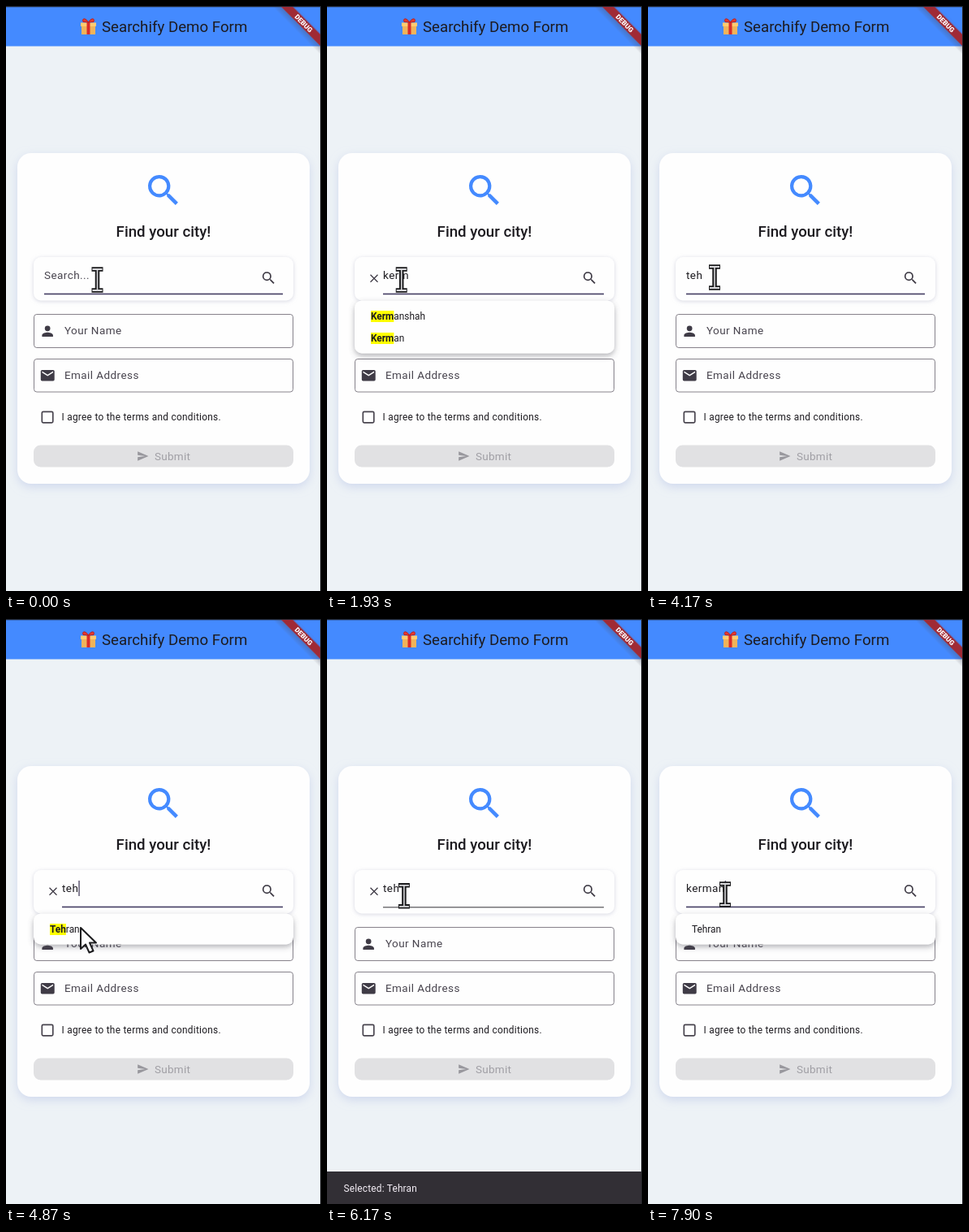
An HTML page for the animation above (8 s loop, 388x720 px).

```html
<!DOCTYPE html>
<html lang="en">
<head>
<meta charset="utf-8">
<title>Searchify Demo Form</title>
<style>
  html, body { margin: 0; height: 100%; overflow: hidden; background: #edf2f6; }
  svg { display: block; width: 388px; height: 720px; }
  text { font: 11.85px Roboto, sans-serif; fill: #1d1b20; white-space: pre; }
  .body { font-size: 13.5px; letter-spacing: .42px; }
  .label { fill: #49454f; }
  .small { letter-spacing: .28px; }
  .bold { font-weight: 700; }
  .field { fill: none; stroke: #79747e; stroke-width: .9; }
  .hover { stroke: #1d1b20; }
  .card { fill: #fefefe; }
  .icon { fill: #3f3b46; }
</style>
</head>
<body>
<svg viewBox="0 0 388 720">
  <defs>
    <filter id="glow" x="-10%" y="-10%" width="120%" height="125%">
      <feDropShadow dx="0" dy="4" stdDeviation="6" flood-color="#c3cdea" flood-opacity=".7"/>
    </filter>
    <filter id="lift" x="-10%" y="-30%" width="120%" height="190%">
      <feDropShadow dx="0" dy="3" stdDeviation="3.5" flood-color="#55555f" flood-opacity=".45"/>
    </filter>
    <filter id="soft" x="-10%" y="-30%" width="120%" height="160%">
      <feDropShadow dx="0" dy="1" stdDeviation="2.5" flood-color="#c4c6d6" flood-opacity=".7"/>
    </filter>
    <path id="lens" d="M15.5 14h-.79l-.28-.27A6.5 6.5 0 1 0 13.73 14.43l.27.28v.79l5 4.99L20.49 19zM9.5 14a4.5 4.5 0 1 1 0-9 4.5 4.5 0 0 1 0 9z"/>
    <path id="beam" d="M-7-13H7M-7 13H7M0-13V13"/>
  </defs>

  <rect width="388" height="720" fill="#edf2f6"/>
  <rect width="388" height="49.500" fill="#448aff"/>
  <rect width="388" height="1.300" fill="#20242c"/>

  <g transform="translate(91 15)">
    <path d="M2 9H19V20H2z" fill="#f0b45a"/>
    <path d="M1 5.500H20V10H1z" fill="#ffcb70"/>
    <path d="M8.500 5H12.500V20H8.500z" fill="#d92b2b"/>
    <path d="M10.500 5C7-1 2 0 4 4.500ZM10.500 5C14-1 19 0 17 4.500Z" fill="#e63a2e" stroke="#b81f1f"/>
  </g>
  <text x="118" y="32" style="font-size:18.7px">Searchify Demo Form</text>

  <svg x="320" y="1" width="67" height="62">
    <g transform="translate(67 0) rotate(45)">
      <rect x="-50" y="23.700" width="100" height="10.200" fill="#a02c36" filter="url(#lift)"/>
      <text y="31.800" text-anchor="middle" style="font-size:8.5px;font-weight:900;fill:#fff">DEBUG</text>
    </g>
  </svg>

  <rect class="card" x="14" y="181" width="360" height="407" rx="17" filter="url(#glow)"/>
  <use href="#lens" transform="translate(168.600 201.600) scale(2.115)" fill="#448aff"/>
  <text x="194" y="284" text-anchor="middle" style="font-size:18.7px;font-weight:500">Find your city!</text>

  <rect class="card" x="34" y="309" width="320" height="53.500" rx="9" filter="url(#soft)"/>
  <use href="#lens" class="icon" transform="translate(313.300 324.600) scale(.846)"/>
  <rect id="line"/>
  <path id="clear" d="M53.500 330.700l9 9m0-9l-9 9" stroke="#3f3b46" stroke-width="1.3"/>
  <text id="query" y="336"></text>
  <rect id="caret" y="322" width="1.500" height="19" fill="#5d5872"/>

  <rect id="name" class="field" x="34.500" y="379.500" width="319" height="41" rx="3.400"/>
  <path class="icon" transform="translate(41 390) scale(.846)" d="M12 12a4 4 0 1 0 0-8 4 4 0 0 0 0 8zm0 2c-2.670 0-8 1.340-8 4v2h16v-2c0-2.660-5.330-4-8-4z"/>
  <text class="body label" x="72" y="404">Your Name</text>

  <rect class="field" x="34.500" y="434.500" width="319" height="40.500" rx="3.400"/>
  <path class="icon" transform="translate(41.100 444.500) scale(.846)" d="M20 4H4a2 2 0 0 0-2 2v12a2 2 0 0 0 2 2h16a2 2 0 0 0 2-2V6a2 2 0 0 0-2-2zm0 4l-8 5-8-5V6l8 5 8-5z"/>
  <text class="body label" x="72" y="459">Email Address</text>

  <rect x="44.300" y="499.300" width="13.500" height="13.500" rx="1.500" fill="none" stroke="#49454f" stroke-width="1.700"/>
  <text class="small" x="68.500" y="510">I agree to the terms and conditions.</text>

  <rect x="34" y="540.500" width="320" height="27" rx="8.500" fill="#e1e1e3"/>
  <path transform="translate(160.900 546.400) scale(.635)" fill="#98979d" d="M2 21L23 12 2 3v7l15 2-15 2z"/>
  <text x="183" y="559" class="body" style="fill:#a09fa5;letter-spacing:.25px">Submit</text>

  <g id="menu">
    <rect id="panel" class="card" x="34" y="362.500" width="320" rx="9" filter="url(#lift)"/>
    <g id="rows"></g>
  </g>

  <g id="snack">
    <rect y="680" width="388" height="40" fill="#322f35"/>
    <text id="note" x="20.500" y="705" style="fill:#f5eff7;letter-spacing:.21px">Selected: Tehran</text>
  </g>
  <rect x="387" width="1" height="720" fill="#25262a"/>

  <g id="ibeam" fill="none">
    <use href="#beam" stroke="#1c1c1e" stroke-width="5.500"/>
    <use href="#beam" stroke="#d9d9dc" stroke-width="1.800" transform="scale(.86 1)"/>
  </g>
  <path id="arrow" d="M0 0V26L6 20.500 10.500 30.500 15.500 28.500 11 18.500H19Z" fill="#fff" stroke="#1c1c1e" stroke-width="2" stroke-linejoin="round"/>
</svg>

<script>
const LOOP = 8000;
const $ = id => document.getElementById(id);
const set = (id, attrs) => { for (const k in attrs) $(id).setAttribute(k, attrs[k]); };
const show = (id, on) => set(id, { visibility: on ? 'visible' : 'hidden' });

// Each step changes only the listed parts of the form state.
const steps = [
  [0, { text: '', clear: 0, list: [], focus: 1, caret: 0 }],
  [100, { text: 'k', caret: 1 }],
  [200, { text: 'ke' }],
  [400, { text: 'ker' }],
  [530, { text: 'kerm' }],
  [870, { clear: 1, list: ['Kermanshah', 'Kerman'] }],
  [1030, { caret: 0 }],
  [1230, { caret: 1 }],
  [1530, { caret: 0 }],
  [2330, { text: '', clear: 0, list: [], focus: 0 }],
  [2570, { focus: 1, caret: 1 }],
  [3070, { caret: 0 }],
  [3400, { text: 't', caret: 1 }],
  [3670, { text: 'te' }],
  [3870, { text: 'teh' }],
  [4170, { caret: 0 }],
  [4270, { clear: 1, list: ['Tehran'], caret: 1 }],
  [4900, { list: [], focus: 0, caret: 0 }],
  [6330, { list: ['Tehran'], focus: 1, caret: 1 }],
  [6800, { caret: 0 }],
  [7100, { text: 'k', clear: 0, caret: 1 }],
  [7200, { text: 'ke' }],
  [7400, { text: 'ker' }],
  [7530, { text: 'kerm' }],
  [7670, { text: 'kerma' }],
  [7770, { text: 'kerman' }]
];

// Pointer path: time, x, y
const path = [
  [0, 112.5, 337], [1700, 112.5, 337], [2250, 58, 337], [2470, 60, 339],
  [2800, 82, 334], [4270, 82, 334], [4750, 92, 380], [5470, 92, 380],
  [5530, 93.5, 377], [6270, 95, 339], [LOOP, 95, 339]
];

const clamp = v => Math.max(0, Math.min(1, v));
const ease = v => { v = clamp(v); return v * v * (3 - 2 * v); };

function pointer(t) {
  const i = path.findIndex(p => p[0] > t);
  const [t0, x0, y0] = path[i - 1], [t1, x1, y1] = path[i];
  const k = ease((t - t0) / (t1 - t0));
  return [x0 + (x1 - x0) * k, y0 + (y1 - y0) * k];
}

function add(tag, parent, attrs, text = '') {
  const el = document.createElementNS('http://www.w3.org/2000/svg', tag);
  for (const k in attrs) el.setAttribute(k, attrs[k]);
  el.textContent = text;
  parent.append(el);
  return el;
}

function drawRows(list, query) {
  const rows = $('rows');
  rows.replaceChildren();
  list.forEach((city, i) => {
    const y = 386 + 27 * i;
    const n = city.toLowerCase().startsWith(query) ? query.length : 0;
    const mark = add('rect', rows, { x: 54, y: y - 11, height: 14, fill: '#ffff00' });
    const label = add('text', rows, { x: 54, y });
    const hit = add('tspan', label, { class: 'bold' }, city.slice(0, n));
    mark.setAttribute('width', n ? hit.getComputedTextLength() : 0);
    add('tspan', label, {}, city.slice(n));
  });
}

let drawn = '';
function drawForm(s) {
  const key = JSON.stringify(s);
  if (key === drawn) return;
  drawn = key;
  const left = s.clear ? 69 : 47, query = $('query');
  query.textContent = s.text || 'Search...';
  set('query', { x: left, class: s.text ? 'body' : 'body label' });
  set('caret', { x: left + (s.text ? query.getComputedTextLength() : 0) });
  show('caret', s.caret);
  show('clear', s.clear);
  set('line', {
    x: left, width: 341 - left,
    y: s.focus ? 353.6 : 354.4, height: s.focus ? 1.7 : .9,
    fill: s.focus ? '#4b4569' : s.hover ? '#1d1b20' : '#79747e'
  });
  show('menu', s.list.length);
  set('panel', { height: 11 + 27 * s.list.length });
  drawRows(s.list, s.text);
}

function draw(t) {
  const [x, y] = pointer(t), overSearch = y < 362;
  const s = Object.assign({ hover: overSearch }, ...steps.filter(p => p[0] <= t).map(p => p[1]));
  drawForm(s);

  const rise = ease((t - 4920) / 250) - ease((t - 7650) / 250);
  set('snack', { transform: `translate(0 ${40 * (1 - rise)})` });
  set('note', { opacity: clamp((rise - .4) / .6) });

  set('ibeam', { transform: `translate(${x} ${y})` });
  set('arrow', { transform: `translate(${x} ${y})` });
  show('ibeam', overSearch);
  show('arrow', !overSearch);
  set('name', { class: y > 372 && !s.list.length ? 'field hover' : 'field' });
}

const start = performance.now();
function tick() {
  draw((performance.now() - start) % LOOP);
  requestAnimationFrame(tick);
}
tick();
</script>
</body>
</html>
```
